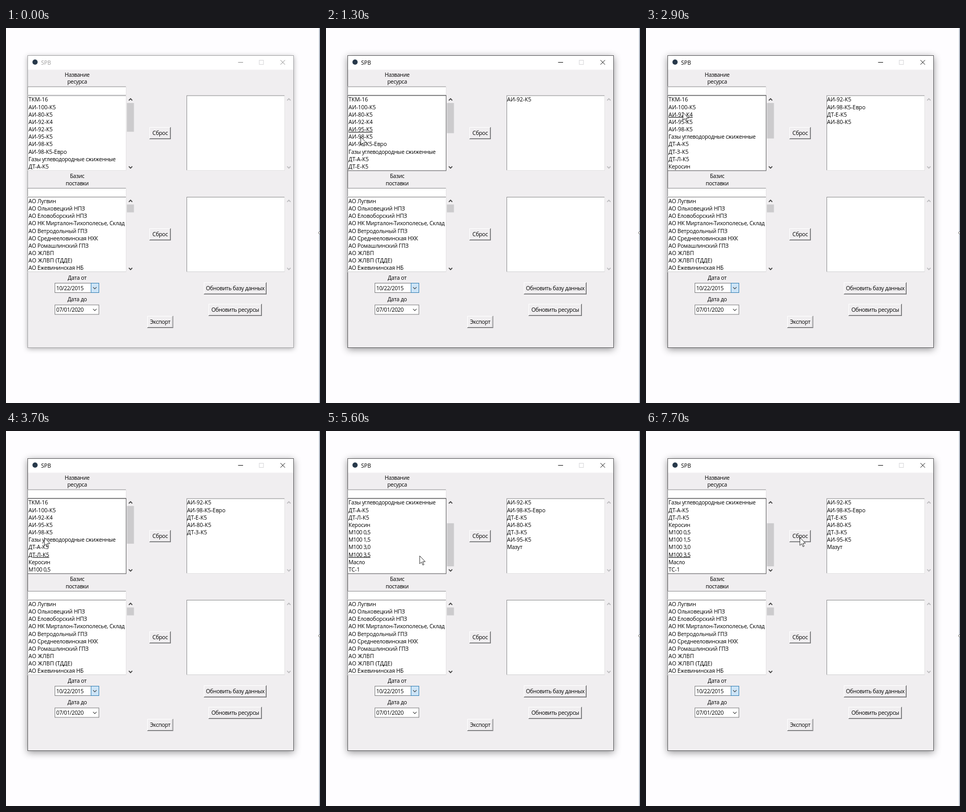
Animation of 600 by 715 pixels, one loop 8 s. Source, as an HTML page:

```html
<!DOCTYPE html>
<html lang="ru">
<head>
<meta charset="utf-8">
<title>SPB</title>
<style>
  html, body { margin: 0; width: 100%; height: 100%; overflow: hidden; background: #fefdff; }
  svg { display: block; width: 600px; height: 715px; }
  text { font: 10.5px "Open Sans", "Noto Sans", sans-serif; fill: #000; white-space: pre; }
  #frame { fill: #f0eef0; filter: drop-shadow(0 2px 5px rgba(0,0,0,.3)); }
  .active #frame { filter: drop-shadow(0 3px 7px rgba(0,0,0,.42)); }
  #edge { fill: none; stroke: #a3a3a5; }
  .active #edge { stroke: #59595b; }
  #caption text { fill: #9a9a9a; }
  .active #caption text { fill: #000; }
  #caption path { fill: none; stroke: #8c8c8c; }
  .active #caption path { stroke: #111; }
  #focus { fill: none; stroke: #606062; visibility: hidden; }
  .active #focus { visibility: visible; }
</style>
</head>
<body>
<svg id="stage" viewBox="0 0 600 715"></svg>
<script>
const LOOP = 8000, STEP = 100, ROW = 14.17, VISIBLE = 10, FIRST_ROW = 140.4;
const ACTIVATE = 1000, SCROLL = 4800, FACE = '#f0eef0';
const stage = document.getElementById('stage');

const resources = ['ТКМ-16', 'АИ-100-К5', 'АИ-80-К5', 'АИ-92-К4', 'АИ-92-К5', 'АИ-95-К5',
  'АИ-98-К5', 'АИ-98-К5-Евро', 'Газы углеводородные сжиженные', 'ДТ-А-К5', 'ДТ-Е-К5',
  'ДТ-З-К5', 'ДТ-Л-К5', 'Керосин', 'М100 0,5', 'М100 1,5', 'М100 3,0', 'Мазут',
  'М100 3,5', 'Масло', 'ТС-1'];
const bases = ['АО Лугвин', 'АО Ольховецкий НПЗ', 'АО Еловоборский НПЗ',
  'АО НК Мирталон-Тихополесье, Склад', 'АО Ветродольный ГПЗ', 'АО Среднееловинская НХК',
  'АО Ромашлинский ГПЗ', 'АО ЖЛВП', 'АО ЖЛВП (ТДДЕ)', 'АО Ежевининская НБ'];

// When each item is clicked over to the right-hand list
const picks = { 'АИ-92-К5': ACTIVATE, 'АИ-98-К5-Евро': 1700, 'ДТ-Е-К5': 2200, 'АИ-80-К5': 2900,
  'ДТ-З-К5': 3600, 'АИ-95-К5': 4000, 'Мазут': 5300 };

// Contents of the lists at time t
function listsAt(t) {
  const items = resources.slice(), moved = [];
  let current = -1;
  for (const name in picks) {
    if (t < picks[name]) break;
    current = items.indexOf(name);
    items.splice(current, 1);
    moved.push(name);
  }
  const offset = t < SCROLL ? 0 : items.length - VISIBLE;
  return { items, moved, current, offset };
}

// The pointer settles on a row shortly before its click and drifts slowly right.
function stopFor(name) {
  const leave = picks[name], { items, offset } = listsAt(leave - 1);
  const row = items.indexOf(name) - offset;
  return { arrive: leave - 200, leave, x: 62 + leave * .003, y: 132.5 + ROW * row };
}
const stop = (arrive, leave, x, y) => ({ arrive, leave, x, y });
const stops = [
  stop(100, 100, 468, 522),
  ...Object.keys(picks).map(stopFor),
  stop(4500, SCROLL, 76, 262),
  stop(5600, 5600, 179, 238),
  stop(5800, 5900, 369, 206),
  stop(6100, 6200, 410, 230),
  stop(6800, 6900, 48, 190),
  stop(7300, 7300, 380, 178),
  stop(7700, LOOP, 294, 203)
].sort((a, b) => a.arrive - b.arrive);

function pointerAt(t) {
  const i = stops.findIndex(s => t <= s.leave);
  const to = stops[i], from = stops[i - 1] || to;
  const k = t >= to.arrive ? 1 : (t - from.leave) / (to.arrive - from.leave);
  const ease = k * k * (3 - 2 * k);
  return [from.x + (to.x - from.x) * ease, from.y + (to.y - from.y) * ease];
}

function add(tag, attrs, parent = stage) {
  const node = document.createElementNS('http://www.w3.org/2000/svg', tag);
  for (const key in attrs) node.setAttribute(key, attrs[key]);
  return parent.appendChild(node);
}

const rect = (x, y, width, height, fill) => add('rect', { x, y, width, height, fill });

// Lower-case words are set tighter than codes and capitals.
function setText(node, value) {
  if (node.textContent === value) return;
  const lower = (value.match(/[а-я]/g) || []).length / (value.length || 1);
  const spacing = /[\/,]\d/.test(value) ? -.36 : .05 - .4 * lower;
  node.style.letterSpacing = spacing.toFixed(2) + 'px';
  node.textContent = value;
}

function label(value, x, y, anchor = 'start', parent) {
  const node = add('text', { x, y, 'text-anchor': anchor }, parent);
  setText(node, value);
  return node;
}

function sunken(x, y, w, h) {
  rect(x, y, w, h, '#e4e3e4');
  rect(x, y, w - 1, h - 1, '#8e8e90');
  rect(x + 1, y + 1, w - 2, h - 2, '#fff');
}

function button(value, x, y, w) {
  const h = 23;
  rect(x, y, w, h, '#6b6b6d');
  rect(x, y, w - 1, h - 1, '#fff');
  rect(x + 1, y + 1, w - 2, h - 2, '#a5a5a7');
  rect(x + 1, y + 1, w - 3, h - 3, FACE);
  label(value, x + w / 2, y + 15.2, 'middle');
}

function chevron(x, y, dir, stroke, width = 1.7) {
  add('path', { d: `M${x - 3.3} ${y - dir * 1.6}l3.3 ${dir * 3.3}l3.3 ${-dir * 3.3}`,
    fill: 'none', stroke, 'stroke-width': width });
}

function scrollbar(x, y, stroke) {
  rect(x - 7, y, 14, 143, FACE);
  chevron(x, y + 7.5, -1, stroke);
  chevron(x, y + 136.5, 1, stroke);
}

const rows = (count, x, y) => Array.from({ length: count }, (_, i) => label('', x, y + i * ROW));

function combo(title, value, y, hot) {
  label(title, 136, y - 6.3, 'middle');
  add('rect', { x: 93.5, y: y + .5, width: 84, height: 18, fill: '#fff', stroke: '#7d7d7f' });
  if (hot) add('rect', { x: 162.5, y: y + .5, width: 15, height: 18, fill: '#cce4f7', stroke: '#3580b5' });
  label(value, 96, y + 13.7);
  chevron(169.7, y + 9.8, 1, '#444', 1.1);
}

function panel(first, second, dy) {
  label(first, 136, 92.8 + dy, 'middle');
  label(second, 136, 106 + dy, 'middle');
  sunken(41, 111.5 + dy, 189, 17);
  sunken(41, 128.5 + dy, 189, 143.5);
  sunken(345, 128.5 + dy, 188, 143.5);
  const left = rows(VISIBLE, 43, FIRST_ROW + dy);
  const right = rows(Object.keys(picks).length, 346, FIRST_ROW + dy);
  scrollbar(238, 129 + dy, '#444');
  scrollbar(540.5, 129 + dy, '#bdbdbf');
  button('Сброс', 274, Math.floor(189 + dy), 41);
  return { left, right, thumb: rect(231, 143 + dy, 13.5, 15, '#cccbcd') };
}

// Desktop and window frame
rect(598, 0, 2, 715, '#b4bcc8');
add('circle', { cx: 599.5, cy: 390.5, r: 2, fill: '#fff', stroke: '#555' });
add('rect', { id: 'frame', x: 41, y: 52, width: 509, height: 558 });
rect(41, 52, 509, 27.5, '#fff');
add('rect', { id: 'edge', x: 41.5, y: 52.5, width: 508, height: 557 });
add('circle', { cx: 55.5, cy: 65, r: 5, fill: '#27394a' });
const caption = add('g', { id: 'caption' });
label('SPB', 67, 69.7, 'start', caption);
add('path', { d: 'M443.5 65.5h9.5M524.5 61.2l8.6 8.6m0 -8.6l-8.6 8.6' }, caption);
add('rect', { x: 484, y: 61.5, width: 8, height: 8, fill: 'none', stroke: '#d6d6d8' });

// Window contents
const { left, right, thumb } = panel('Название', 'ресурса', 0);
const lower = panel('Базис', 'поставки', 193.5);
bases.forEach((name, i) => setText(lower.left[i], name));
add('rect', { id: 'focus', x: 41.5, y: 128.5, width: 188, height: 143.5 });
combo('Дата от', '10/22/2015', 486, true);
combo('Дата до', '07/01/2020', 527.5, false);
button('Обновить базу данных', 378, 485, 120);
button('Обновить ресурсы', 387, 526, 102);
button('Экспорт', 270, 549, 49.5);

const pointer = add('path', { d: 'M0 0V15.2L3.5 11.9L6 17.6L8.2 16.7L5.8 11.1H10.6Z',
  fill: '#fff', stroke: '#1c1c1c', 'stroke-width': .9 });

function render(t) {
  const { items, moved, current, offset } = listsAt(t);
  stage.classList.toggle('active', t >= ACTIVATE);
  left.forEach((node, i) => {
    setText(node, items[i + offset]);
    node.style.textDecoration = i + offset === current ? 'underline' : 'none';
  });
  right.forEach((node, i) => setText(node, moved[i] || ''));
  thumb.setAttribute('y', 143 + 115 * offset / items.length);
  thumb.setAttribute('height', 115 * VISIBLE / items.length);
  pointer.style.visibility = t < stops[0].arrive ? 'hidden' : 'visible';
  pointer.setAttribute('transform', `translate(${pointerAt(t)})`);
}

const start = performance.now();
function tick() {
  const t = (performance.now() - start) % LOOP;
  render(Math.floor(t / STEP) * STEP);
  requestAnimationFrame(tick);
}
tick();
</script>
</body>
</html>
```
